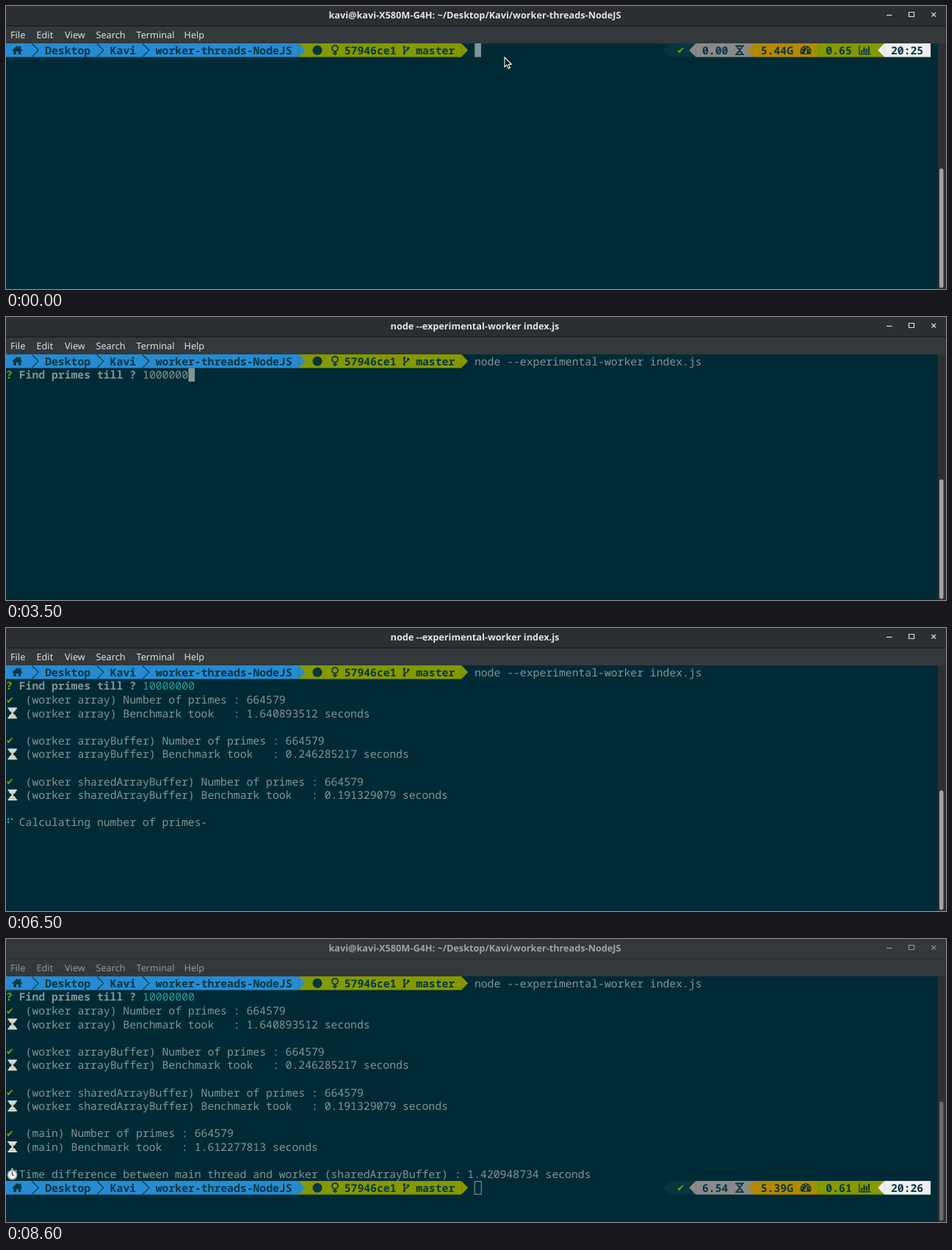
Animation, 1280 px wide and 386 px high, one loop 8.7 s. Source, as an HTML page:

```html
<!DOCTYPE html>
<html lang="en">
<head>
<meta charset="utf-8">
<title>Terminal session</title>
<style>
html, body { margin: 0; width: 100%; height: 100%; overflow: hidden; background: #002b36; }
svg { display: block; width: 1280px; height: 386px; }
text { white-space: pre; text-rendering: geometricPrecision; }
.mono { font: 500 14.767px "Noto Sans Mono", monospace; }
.ui { font: 12.7px "Noto Sans", "Open Sans", sans-serif; }
.sym { font: 13px "DejaVu Sans", sans-serif; }
</style>
</head>
<body>
<svg id="stage" viewBox="0 0 1280 386" xmlns="http://www.w3.org/2000/svg"></svg>
<script>
const LOOP = 8700, CW = 8.86, RH = 18.6, TOP = 51;
const C = {
  bg: '#002b36', ink: '#073642', fg: '#839496', dim: '#586e75', blue: '#268bd2',
  green: '#859900', teal: '#2aa198', gray: '#8a8a8a', gold: '#b58900', white: '#eeeeee'
};
const stage = document.getElementById('stage');
const colX = c => c * CW;
const rowY = r => TOP + r * RH;

const rect = (x, y, w, h, fill, more = '') =>
  `<rect x="${x}" y="${y}" width="${w}" height="${h}" fill="${fill}" ${more}/>`;
const path = (d, fill, stroke = 'none', w = 1) =>
  `<path d="${d}" fill="${fill}" stroke="${stroke}" stroke-width="${w}"/>`;
const circle = (x, y, r, fill, more = '') =>
  `<circle cx="${x}" cy="${y}" r="${r}" fill="${fill}" ${more}/>`;
const at = (x, y, s) => `<g transform="translate(${x} ${y})">${s}</g>`;
const mono = (c, r, s, fill = C.fg, weight = 500) =>
  `<text class="mono" x="${colX(c)}" y="${rowY(r) + 14.8}" fill="${fill}" style="font-weight:${weight}">${s}</text>`;
const tick = (x, r) =>
  `<text class="sym" x="${x}" y="${rowY(r) + 14.3}" fill="${C.green}">✔</text>`;

// Small icons, each drawn around its own centre
const icon = {
  home: path('M-7 0L0-6.2L2.8-3.7V-5.6H5V-1.8L7 0L6 1L5 .2V5.6H1.5V1.6H-1.5V5.6H-5V.2L-6 1Z', C.ink),
  commit: circle(0, -2.5, 4, 'none', `stroke="${C.ink}" stroke-width="1.7"`) +
    path('M0 1.5V7M-3 4.3H3', 'none', C.ink, 1.7),
  branch: path('M-2.7-3.5V4M2.7-2.5C2.7 1-2.7 0-2.7 3.5', 'none', C.ink, 1.6) +
    circle(-2.7, -4.2, 1.8, C.ink) + circle(-2.7, 4.5, 1.8, C.ink) + circle(2.7, -3, 1.8, C.ink),
  glass: path('M-6-6.8H6V-5H-6ZM-6 5H6V6.8H-6Z', C.ink) +
    path('M-4.3-5C-4.3-1.5-1-1.5-1 0S-4.3 1.5-4.3 5H4.3C4.3 1.5 1 1.5 1 0S4.3-1.5 4.3-5Z', C.ink) +
    path('M-2.6-4.4H2.6L1.8-2.7H-1.8ZM-2.6 4.7L0 2L2.6 4.7Z', C.gray),
  gauge: path('M-6.3 5.5A7.5 7.5 0 1 1 6.3 5.5Z', C.ink) +
    path('M0 3L1.6-2.6', 'none', C.gold, 1.3) + circle(0, 3, 1.8, C.gold) +
    [[-5, 1], [-3.5, -2.6], [0, -4], [3.8, -2.4], [5, 1]].map(p => circle(p[0], p[1], 1, C.gold)).join(''),
  bars: path('M-7.5-6V5.5H8', 'none', C.ink, 1.4) +
    [4, 8, 6, 9.5].map((h, i) => rect(-5.3 + i * 3.2, 4 - h, 2.2, h, C.ink)).join(''),
  sand: path('M-5-6H5C5-2 1-1.8 1 0S5 2 5 6H-5C-5 2-1 1.8-1 0S-5-2-5-6Z', '#c9dde3') +
    path('M-3.5-3H3.5L0 .3ZM-4 5.5L0 2.4L4 5.5Z', '#e3c48b') +
    rect(-6.3, -7.5, 12.6, 2, '#dddddd', 'rx=".6"') + rect(-6.3, 5.5, 12.6, 2, '#dddddd', 'rx=".6"'),
  watch: rect(-1.5, -8, 3, 3, '#9aa5a8') + path('M4.5-5.5L6-4', 'none', '#9aa5a8', 2) +
    circle(0, 1, 6.2, '#f0f0f0', 'stroke="#9aa5a8" stroke-width="1.6"') +
    path('M0 1V-3M0 1L2 2', 'none', '#333333', 1.2)
};

function windowFrame(title, active) {
  const ink = active ? '#dfdfdb' : '#929595';
  const titleInk = active ? '#e4e4e0' : '#a0a3a3';
  const menu = [['File', 6], ['Edit', 41.5], ['View', 80], ['Search', 122.5], ['Terminal', 177.5], ['Help', 242.5]];
  return rect(0, 0, 1280, 386, C.bg) +
    rect(0, 0, 1280, 27, active ? '#2b2f31' : '#33393b') +
    rect(0, 26.5, 1280, 1.5, active ? '#1b1e1f' : '#2a2f31') +
    rect(0, 28, 1280, 23, '#33393b') +
    `<text class="ui" x="638.5" y="16.7" text-anchor="middle" font-weight="700" style="font-weight:700" fill="${titleInk}">${title}</text>` +
    menu.map(m => `<text class="ui" x="${m[1]}" y="44.3" fill="${ink}">${m[0]}</text>`).join('') +
    path('M1199 12.5H1206.5', 'none', ink, 1.2) +
    path('M1229.5 8.5H1236.5V14.5H1229.5Z', 'none', ink, 1.2) +
    path('M1260.5 9L1266 14.5M1266 9L1260.5 14.5', 'none', ink, 1.2) +
    rect(1269, 51, 11, 335, '#2d3032') +
    rect(1271, 221.5, 5.5, 163, active ? '#a2a4a4' : '#6a6d6e', 'rx="2.7"');
}

// Arrow filling one cell, pointing right (dir 1) or left (dir -1)
function arrow(c, y, fill, dir) {
  const a = colX(dir > 0 ? c : c + 1), b = colX(dir > 0 ? c + 1 : c);
  return path(`M${a} ${y}L${b} ${y + RH / 2}L${a} ${y + RH}Z`, fill);
}

function prompt(r) {
  const y = rowY(r), mid = y + RH / 2;
  const chevron = c => path(`M${colX(c)} ${y + .5}L${colX(c + 1)} ${mid}L${colX(c)} ${y + RH - .5}`, 'none', C.ink, 1.1);
  const label = (c, s) => mono(c, r, s, C.ink, 600);
  return rect(0, y, colX(45), RH, C.blue) + rect(colX(45), y, colX(25), RH, C.green) +
    arrow(45, y, C.blue, 1) + arrow(70, y, C.green, 1) +
    [4, 14, 21].map(chevron).join('') +
    label(6, 'Desktop') + label(16, 'Kavi') + label(23, 'worker-threads-NodeJS') +
    label(52, '57946ce1') + label(63, 'master') +
    at(15.3, mid, icon.home) + circle(424, mid, 6.5, C.ink) +
    at(448, mid, icon.commit) + at(545, mid, icon.branch);
}

function status(r, took, mem, load, clock) {
  const y = rowY(r), mid = y + RH / 2;
  const part = (c, end, fill, textCol, s) => arrow(c, y, fill, -1) +
    rect(colX(c + 1), y, colX(end - c - 1), RH, fill) + mono(textCol, r, s, C.ink, 600);
  // Each part runs under the tip of the next one
  return part(101, 106, C.ink, 0, '') + tick(913.5, r) +
    part(105, 115, C.gray, 107, took) + part(114, 125, C.gold, 116, mem) +
    part(124, 135, C.green, 126, load) + part(134, 142.1, C.white, 136, clock) +
    at(999, mid, icon.glass) + at(1089, mid, icon.gauge) + at(1169.5, mid, icon.bars);
}

const block = (c, r) => rect(colX(c) + .3, rowY(r), 8.7, RH, C.fg);
const hollow = (c, r) => rect(colX(c) + .3, rowY(r) + .6, 9, RH - 1, 'none', `stroke="${C.fg}" stroke-width="1.1"`);
const pointer = (x, y) => at(x, y,
  path('M0 0V13L3 10.3L5.2 15.4L7.4 14.5L5.2 9.5H9.3Z', '#111111', '#ffffff', 1.1));

function spinner(r, right) {
  const y = rowY(r) + 5;
  return [[3.2, y], [8, y], [right ? 8 : 3.2, y + 4]]
    .map(p => rect(p[0] - 1.3, p[1] - 1.2, 2.6, 2.5, C.teal)).join('') +
    mono(2, r, 'Calculating number of primes-');
}

const jobs = [
  [5600, 'worker array', '1.640893512'],
  [5900, 'worker arrayBuffer', '0.246285217'],
  [6500, 'worker sharedArrayBuffer', '0.191329079'],
  [7600, 'main', '1.612277813']
];
const job = (r, name, secs) =>
  tick(0, r) + mono(3, r, `(${name}) Number of primes : 664579`) +
  at(8.7, rowY(r + 1) + 9.3, icon.sand) +
  mono(3, r + 1, `(${name}) Benchmark took   : ${secs} seconds`);

// Number of digits typed from each moment on
const keys = [[2000, 1], [2200, 2], [2300, 3], [2500, 4], [3000, 6], [3500, 7], [3900, 8]];

function question(t) {
  let s = mono(0, 1, '?', C.green, 700) + mono(2, 1, 'Find primes till ?', C.fg, 700);
  if (t < 2000) {
    s += mono(21, 1, '(100)', C.dim);
    return t >= 1600 && t < 1700 ? s : s + block(27, 1);
  }
  const n = keys.filter(k => k[0] <= t).pop()[1];
  s += mono(21, 1, '1' + '0'.repeat(n - 1), t < 4000 ? C.fg : C.teal);
  return t < 4000 ? s + block(21 + n, 1) : s;
}

function results(t) {
  const done = jobs.filter(j => j[0] <= t);
  let s = done.map((j, i) => job(2 + i * 3, j[1], j[2])).join('');
  if (done.length < jobs.length) return s + spinner(2 + done.length * 3, t >= 4800 && t < 5600);
  return s + at(8.5, rowY(14) + 9.3, icon.watch) +
    mono(2, 14, 'Time difference between main thread and worker (sharedArrayBuffer) : 1.420948734 seconds');
}

function ending(t) {
  if (t < 7900) return block(0, 15);
  let s = prompt(15) + status(15, '6.54', '5.39G', '0.61', '20:26');
  if (t >= 8600) return s + hollow(72, 15);
  if (t < 8300) s += block(72, 15);
  const step = t < 8100 ? 0 : Math.min(3, Math.floor((t - 8000) / 100));
  return s + pointer(673 - step * 129, 66 - step * 14);
}

function scene(t) {
  const running = t >= 1200 && t < 7600;
  let s = windowFrame(running ? 'node --experimental-worker index.js'
    : 'kavi@kavi-X580M-G4H: ~/Desktop/Kavi/worker-threads-NodeJS', t < 8600) + prompt(0);
  const typed = t < 500 ? '' : t < 700 ? 'node ' : 'node --experimental-worker index.js';
  s += mono(72, 0, typed);
  if (t < 1200) s += block(72 + typed.length, 0);
  if (t < 700) s += status(0, '0.00', '5.44G', '0.65', '20:25');
  if (t < 300) s += pointer(679, 70);
  if (t >= 1200) s += question(t);
  if (t >= 4000) s += results(t);
  if (t >= 7600) s += ending(t);
  return s;
}

// Everything changes on a 100 ms grid
let last = -1;
function draw() {
  const t = Math.floor(performance.now() % LOOP / 100) * 100;
  if (t !== last) {
    stage.innerHTML = scene(t);
    last = t;
  }
  requestAnimationFrame(draw);
}
draw();
</script>
</body>
</html>
```
